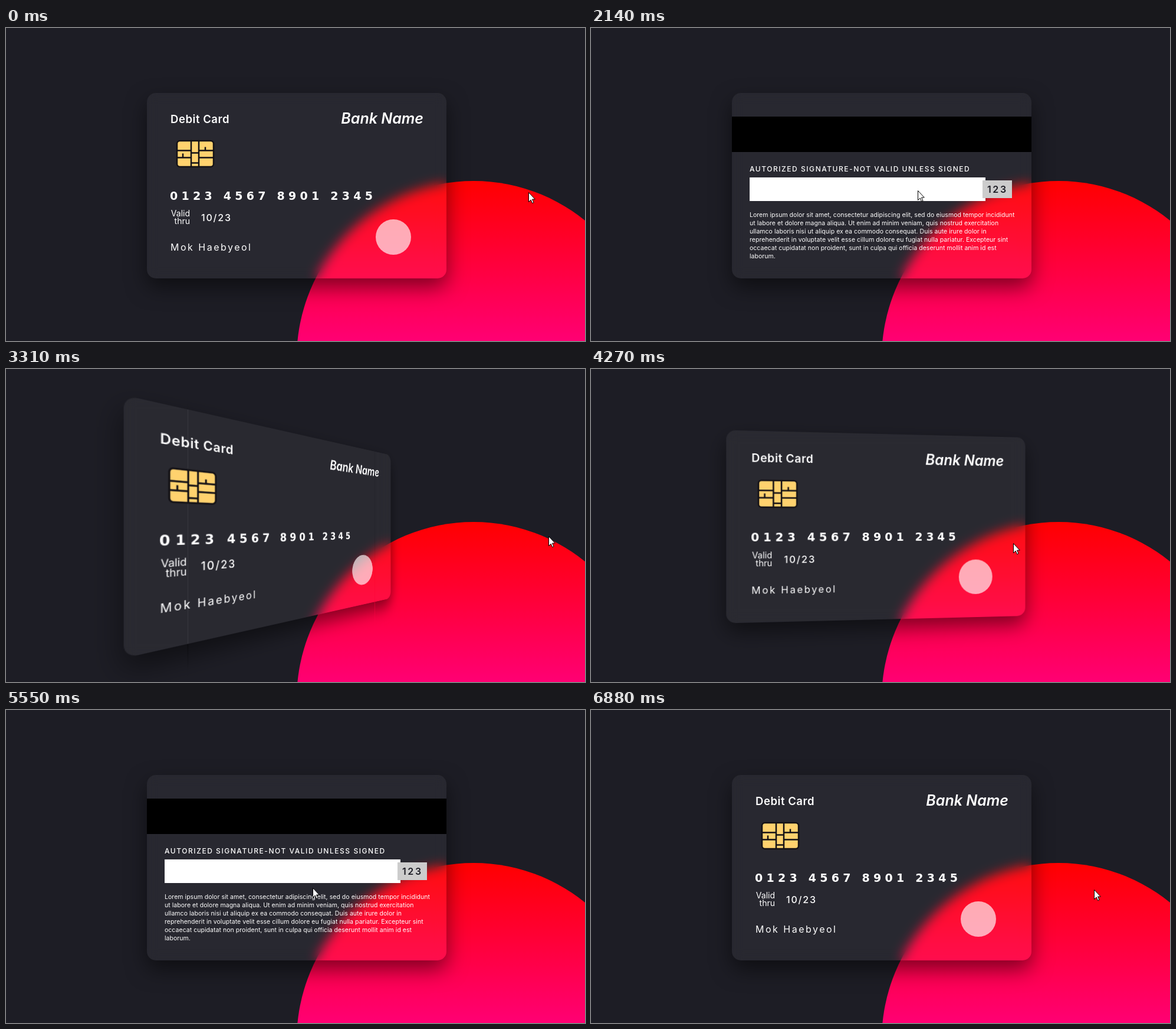
Write an HTML page that moves like this. It is 982 by 530 pixels and loops after 7110 ms.

```html
<!DOCTYPE html>
<html lang="en">
<head>
<meta charset="utf-8">
<title>Flipping debit card</title>
<style>
  html, body { margin: 0; width: 100%; height: 100%; overflow: hidden; background: #1d1d25; }
  #stage { position: relative; width: 100%; height: 100%; overflow: hidden; contain: strict; }
  #disc {
    position: absolute; inset: 0;
    background: linear-gradient(#f00, #f0f) 493px 259px / 600px 600px no-repeat;
    clip-path: circle(300px at 793px 559px);
  }
  #card {
    position: absolute; left: 239px; top: 110px; width: 508px; height: 314px;
    border-radius: 15px; background: rgba(255, 255, 255, .05);
    box-shadow: 0 15px 35px rgba(0, 0, 0, .5);
    -webkit-backdrop-filter: blur(10px); backdrop-filter: blur(10px);
  }
  #card svg { display: block; }
  #cursor { position: absolute; left: 0; top: 0; }
  text { font: 400 16px Inter, sans-serif; fill: #fff; }
  .title { font-size: 18.5px; font-weight: 600; letter-spacing: .55px; }
  .bank { font-size: 25px; font-weight: 600; font-style: italic; text-anchor: end; }
  .number { font: 700 19px "DejaVu Sans", sans-serif; letter-spacing: 6.25px; }
  .valid { font-size: 14px; text-anchor: end; }
  .date { font-weight: 500; letter-spacing: 1.8px; }
  .holder { letter-spacing: 2.5px; }
  .notice { font-size: 12px; font-weight: 500; letter-spacing: 1.55px; }
  .code { font-weight: 600; letter-spacing: 2.6px; fill: #1d1d25; }
  .terms { font-size: 10.5px; letter-spacing: .05px; }
</style>
</head>
<body>
<div id="stage">
<div id="disc"></div>
<div id="card">
  <svg width="508" height="314">
    <g id="front">
      <text class="title" x="40" y="51">Debit Card</text>
      <text class="bank" x="469" y="51.5">Bank Name</text>
      <g stroke="#141216" stroke-width="2.5">
        <rect x="51" y="81" width="62" height="44" rx="5" fill="#ffd26e"/>
        <path fill="none" d="M75 81v44M88 81v44M51 97.5h24M51 109.5h24M88 97.5h25M88 109.5h25M75 101.5h13M75 118.5h13M61 109.5v-7M99 97.5v-6"/>
      </g>
      <text class="number" x="39" y="181">0123 4567 8901 2345</text>
      <text class="valid" x="73" y="209">Valid</text>
      <text class="valid" x="73" y="222">thru</text>
      <text class="date" x="92" y="217">10/23</text>
      <text class="holder" x="40" y="267">Mok Haebyeol</text>
      <circle cx="418" cy="244" r="30" fill="#fff" fill-opacity=".65"/>
    </g>
    <g id="back">
      <rect y="40" width="508" height="60"/>
      <text class="notice" x="30" y="133.5">AUTORIZED SIGNATURE-NOT VALID UNLESS SIGNED</text>
      <rect x="30" y="143" width="400" height="40" fill="#fff"/>
      <rect x="425" y="148" width="50" height="30" fill="#ccc"/>
      <text class="code" x="433" y="169">123</text>
      <text class="terms" y="196">
        <tspan x="30" dy="14">Lorem ipsum dolor sit amet, consectetur adipiscing elit, sed do eiusmod tempor incididunt</tspan>
        <tspan x="30" dy="14">ut labore et dolore magna aliqua. Ut enim ad minim veniam, quis nostrud exercitation</tspan>
        <tspan x="30" dy="14">ullamco laboris nisi ut aliquip ex ea commodo consequat. Duis aute irure dolor in</tspan>
        <tspan x="30" dy="14">reprehenderit in voluptate velit esse cillum dolore eu fugiat nulla pariatur. Excepteur sint</tspan>
        <tspan x="30" dy="14">occaecat cupidatat non proident, sunt in culpa qui officia deserunt mollit anim id est</tspan>
        <tspan x="30" dy="14">laborum.</tspan>
      </text>
    </g>
  </svg>
</div>
<svg id="cursor" width="12" height="20">
  <path d="M.5 .5V16.5L4.2 13 6.6 18.6 9 17.6 6.6 12H11.3Z" fill="#fff" stroke="#000"/>
</svg>
</div>
<script>
const LOOP = 7110, TURN = 1000;
const [card, front, back, cursor] =
  ['card', 'front', 'back', 'cursor'].map(id => document.getElementById(id));

// pointer path: time, x, y
const path = [
  [590, 886, 278], [1113, 747, 272], [1430, 566, 270], [1700, 554, 275],
  [2540, 554, 275], [2811, 747, 279], [3150, 920, 283],
  [4090, 920, 283], [4230, 747, 293], [4480, 560, 305], [4700, 520, 308],
  [5000, 520, 308], [5200, 508, 296], [5549, 508, 296], [5550, 520, 301],
  [5780, 520, 301], [5873, 747, 302], [6000, 861, 304], [6140, 853, 304]
];

// the CSS "ease" curve, cubic-bezier(.25, .1, .25, 1)
function ease(x) {
  if (x <= 0) return 0;
  if (x >= 1) return 1;
  const bez = (a, b, s) => 3 * a * s * (1 - s) ** 2 + 3 * b * s * s * (1 - s) + s ** 3;
  let lo = 0, hi = 1;
  for (let i = 0; i < 24; i++) {
    const mid = (lo + hi) / 2;
    if (bez(.25, .25, mid) < x) lo = mid; else hi = mid;
  }
  return bez(.1, 1, lo);
}

function pointAt(t) {
  const i = path.findIndex(p => p[0] > t);
  if (i === 0) return path[0].slice(1);
  if (i < 0) return path[path.length - 1].slice(1);
  const [t0, x0, y0] = path[i - 1], [t1, x1, y1] = path[i];
  const k = (t - t0) / (t1 - t0);
  return [x0 + (x1 - x0) * k, y0 + (y1 - y0) * k];
}

function draw(now) {
  const t = now % LOOP;
  const turn = start => ease((t - start) / TURN);
  const angle = 180 * (turn(1113) - turn(2811) + turn(4230) - turn(5873));
  const flipped = angle > 90;
  front.style.display = flipped ? 'none' : '';
  back.style.display = flipped ? '' : 'none';
  card.style.transform = `perspective(500px) rotateY(${flipped ? angle - 180 : angle}deg)`;
  const [x, y] = pointAt(t).map(Math.round);
  cursor.style.transform = `translate(${x}px, ${y}px)`;
  requestAnimationFrame(draw);
}
requestAnimationFrame(draw);
</script>
</body>
</html>
```
